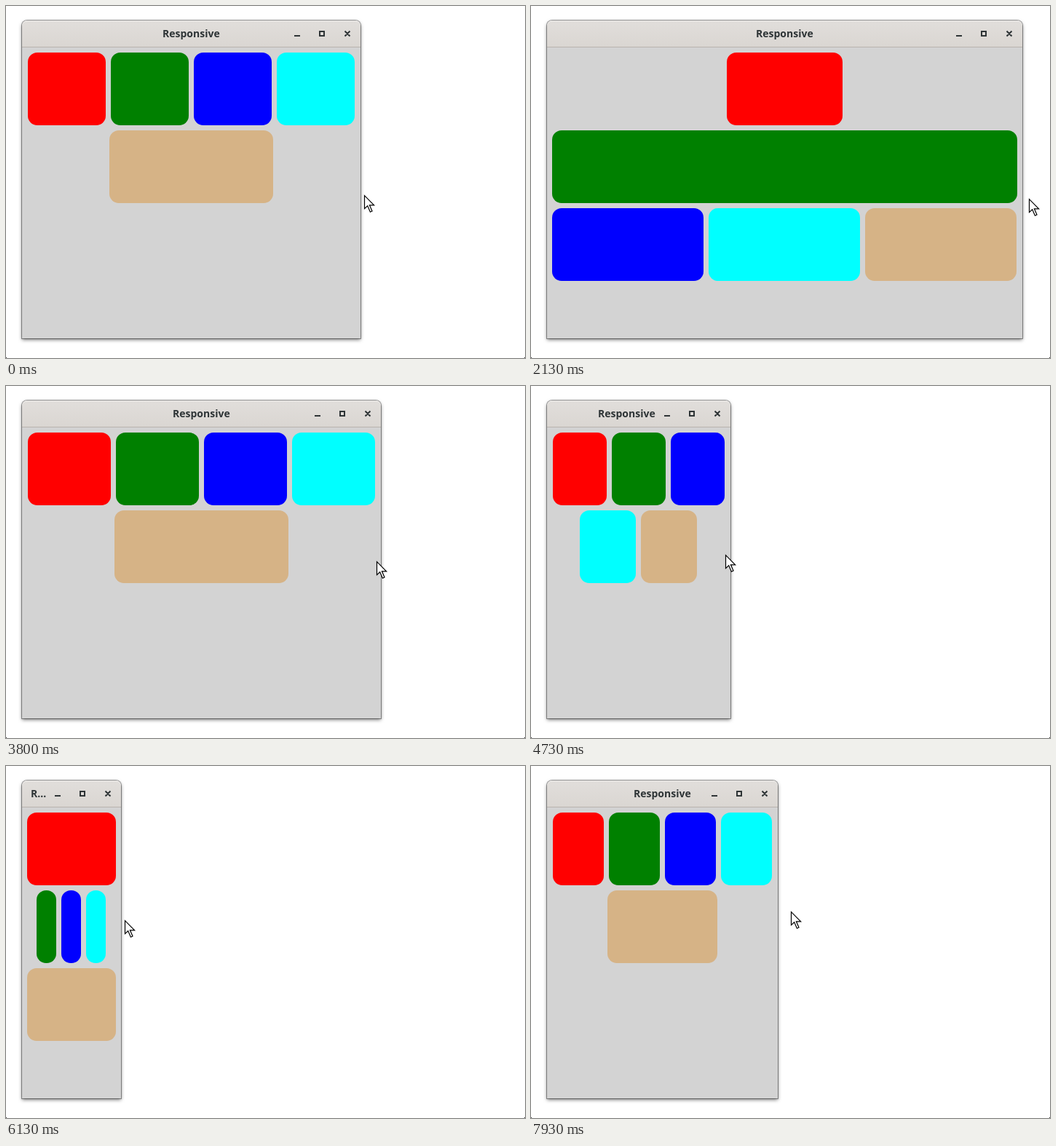
Recreate the animation shown at these times as an HTML page. Size 713x484 px, loop 8 s.

```html
<!DOCTYPE html>
<html lang="en">
<head>
<meta charset="utf-8">
<title>Responsive</title>
<style>
html, body { margin: 0; width: 100%; height: 100%; overflow: hidden; background: #fff; }
body { position: relative; }
div, svg { position: absolute; }
#window {
  left: 22px; top: 20px; height: 437px; background: #d3d3d3;
  border-radius: 7px 7px 0 0;
  box-shadow: 0 0 0 1px rgba(0, 0, 0, .38), 0 2px 5px rgba(0, 0, 0, .55);
}
#bar {
  left: 0; top: 0; width: 100%; height: 36px; overflow: hidden;
  border-radius: 7px 7px 0 0; border-bottom: 1px solid #b9b4ae;
  background: linear-gradient(#e1dedb, #dad6d2);
  box-shadow: inset 0 1px #efedeb;
}
#title {
  top: 0; white-space: pre; color: #2e3436;
  font: 700 14px/36px "Noto Sans", "Open Sans", sans-serif;
}
#buttons { right: 0; top: 0; fill: none; stroke: #2e3436; stroke-width: 2; }
.block { height: 100px; border-radius: 13px; }
#cursor { left: 0; top: 0; overflow: visible; }
.corner { bottom: 0; width: 1px; height: 1px; background: #333; }
</style>
</head>
<body>
<div id="window">
  <div id="bar">
    <div id="title"></div>
    <svg id="buttons" width="100" height="36">
      <path d="M9 21h8M44 15h6v6h-6zM78.5 14.5l7 7m0-7l-7 7"/>
    </svg>
  </div>
</div>
<div class="corner" style="left:0"></div>
<div class="corner" style="right:0"></div>
<svg id="cursor" width="16" height="25">
  <path d="M.5 .7V18.6L4.7 14.8L8.4 23.2L11 22L7.4 13.8H13.6Z" fill="#fff" stroke="#000" stroke-width="1.2"/>
</svg>
<script>
const LOOP = 8000, LEFT = 22, GAP = 7;
const TITLE = 'Responsive';
const byId = id => document.getElementById(id);
const win = byId('window'), title = byId('title'), cursor = byId('cursor');

// [step, window right edge, cursor x, cursor y]; 15 steps per second
const keys = [
  [0, 488, 492, 260], [7, 488, 492, 260], [19, 561, 572, 267], [20, 569, 580, 267],
  [33, 682, 690, 265], [38, 704, 708, 262], [42, 704, 708, 262], [48, 653, 650, 251],
  [55, 553, 546, 243], [57, 516, 509, 241], [68, 308, 300, 234], [71, 275, 267, 232],
  [81, 208, 202, 222], [92, 159, 163, 212], [98, 159, 163, 212], [111, 231, 241, 206],
  [119, 340, 357, 200]
];

// Column spans (of 12) per row, for page widths from a minimum upwards
const layouts = [
  { min: 500, rows: [[3], [12], [4, 4, 4]] },
  { min: 300, rows: [[3, 3, 3, 3], [6]] },
  { min: 200, rows: [[4, 4, 4], [4, 4]] },
  { min: 0, rows: [[12], [3, 3, 3], [12]] }
];

const blocks = ['red', 'green', 'blue', 'cyan', '#d6b386'].map(color => {
  const block = document.createElement('div');
  block.className = 'block';
  block.style.background = color;
  return win.appendChild(block);
});

const pen = document.createElement('canvas').getContext('2d');
pen.font = '700 14px "Noto Sans", "Open Sans", sans-serif';
const textWidth = text => pen.measureText(text).width;

const slope = (i, col) => (keys[i + 1][col] - keys[i][col]) / (keys[i + 1][0] - keys[i][0]);

function tangent(i, col) {
  if (i === 0 || i === keys.length - 1) return slope(Math.max(0, i - 1), col);
  const a = slope(i - 1, col), b = slope(i, col);
  return a * b > 0 ? 2 * a * b / (a + b) : 0;
}

// Monotone cubic interpolation, so pauses stay still
function valueAt(step, col) {
  let i = 0;
  while (i < keys.length - 2 && step >= keys[i + 1][0]) i++;
  const span = keys[i + 1][0] - keys[i][0], u = (step - keys[i][0]) / span, v = 1 - u;
  return Math.round(
    keys[i][col] * (1 + 2 * u) * v * v + keys[i + 1][col] * u * u * (3 - 2 * u) +
    span * u * v * (tangent(i, col) * v - tangent(i + 1, col) * u));
}

function placeTitle(width) {
  const limit = width - 103, room = limit - 6;
  let text = TITLE;
  for (let n = TITLE.length - 1; n >= 0 && textWidth(text) > room; n--) {
    text = TITLE.slice(0, n) + '…';
  }
  const size = textWidth(text);
  title.textContent = text;
  title.style.left = Math.round(Math.min((width - size) / 2, limit - size)) + 'px';
}

function placeBlocks(width) {
  const { rows } = layouts.find(layout => width >= layout.min);
  let index = 0;
  rows.forEach((spans, row) => {
    const gaps = GAP * (spans.length - 1);
    const sizes = spans.map(span => Math.floor((width - 2 * GAP - gaps) * span / 12));
    const total = sizes.reduce((sum, size) => sum + size, gaps);
    let x = Math.floor((width - total) / 2);
    for (const size of sizes) {
      const { style } = blocks[index++];
      style.left = x + 'px';
      style.top = 44 + row * 107 + 'px';
      style.width = size + 'px';
      x += size + GAP;
    }
  });
}

function draw(now) {
  const tick = Math.floor(now % LOOP / 10);
  const step = Math.ceil(3 * (tick + 1) / 20) - 1;
  const width = valueAt(step, 1) - LEFT - 1;
  win.style.width = width + 'px';
  placeTitle(width);
  placeBlocks(width);
  cursor.style.transform = `translate(${valueAt(step, 2)}px, ${valueAt(step, 3)}px)`;
}

const start = performance.now();
function loop() {
  draw(performance.now() - start);
  requestAnimationFrame(loop);
}
loop();
</script>
</body>
</html>
```
